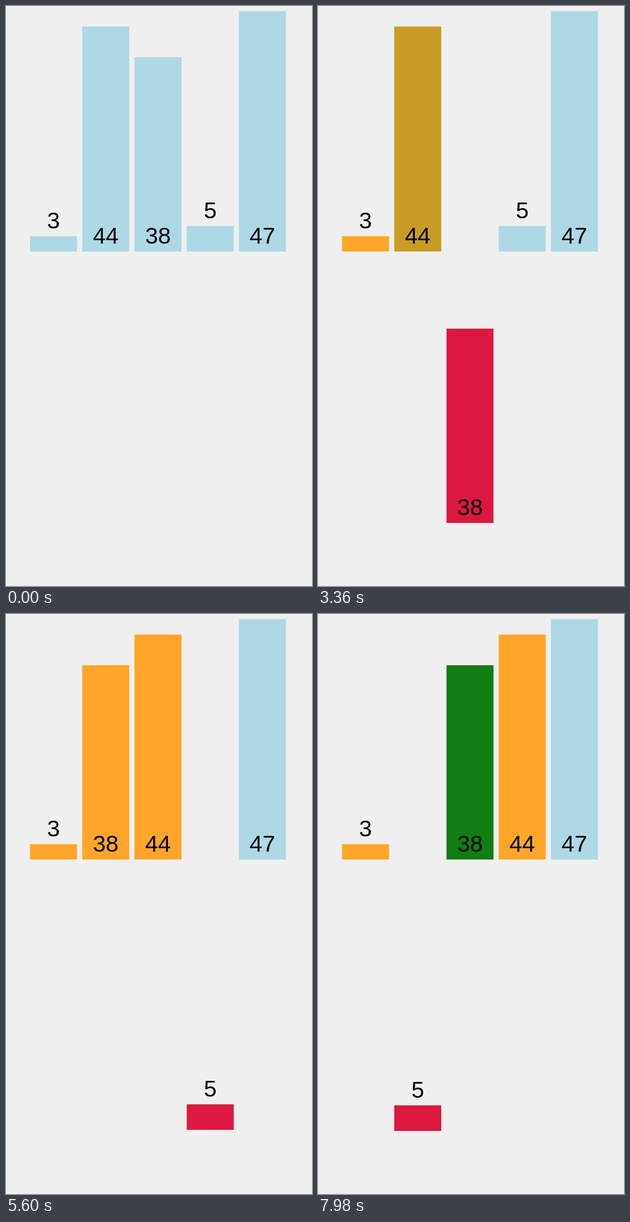
These frames come from a looping animation (544 px wide and 1030 px high, 8 s). An HTML page with a canvas:

```html
<!DOCTYPE html>
<html lang="en">
<head>
<meta charset="utf-8">
<title>Insertion sort</title>
<style>
  html, body { margin: 0; width: 100%; height: 100%; overflow: hidden; background: #efefef; }
  canvas { display: block; }
</style>
</head>
<body>
<canvas id="stage" width="544" height="1030"></canvas>
<script>
const ctx = document.getElementById('stage').getContext('2d');

const LOOP = 8000, TICK = 70, DURATION = 300;
const LEFT = 42.7, PITCH = 92.86, WIDTH = 83.57;
const BASE = 436, DROP = 482, UNIT = 9.08;

const BLUE = [174, 216, 229];
const ORANGE = [255, 165, 41];
const GREEN = [16, 126, 18];
const RED = [221, 24, 64];

const values = [3, 44, 38, 5, 47];

// Each step: start time, then the new properties per bar value.
const steps = [
  [700, { 3: { color: ORANGE } }],
  [1139, { 44: { color: RED, low: 1 } }],
  [1663, { 3: { color: GREEN } }],
  [2187, { 3: { color: ORANGE }, 44: { color: ORANGE, low: 0 } }],
  [2715, { 38: { color: RED, low: 1 } }],
  [3244, { 44: { color: GREEN } }],
  [3768, { 38: { slot: 1 }, 44: { slot: 2 } }],
  [4283, { 3: { color: GREEN }, 44: { color: ORANGE } }],
  [4806, { 3: { color: ORANGE }, 38: { color: ORANGE, low: 0 } }],
  [5330, { 5: { color: RED, low: 1 } }],
  [5863, { 44: { color: GREEN } }],
  [6396, { 5: { slot: 2 }, 44: { slot: 3 } }],
  [6930, { 38: { color: GREEN }, 44: { color: ORANGE } }],
  [7453, { 5: { slot: 1 }, 38: { slot: 2 } }]
];

const mix = (a, b, p) => Array.isArray(a) ? a.map((v, i) => mix(v, b[i], p)) : a + (b - a) * p;
const ease = x => x < 0.5 ? 4 * x ** 3 : 1 - 4 * (1 - x) ** 3;

function barsAt(time) {
  const bars = values.map((value, slot) => ({ value, slot, low: 0, color: BLUE }));
  for (const [start, changes] of steps) {
    if (time <= start) break;
    const p = ease(Math.min(1, (time - start) / DURATION));
    for (const bar of bars) {
      const change = changes[bar.value] || {};
      for (const key in change) bar[key] = mix(bar[key], change[key], p);
    }
  }
  return bars;
}

function drawBar({ value, slot, low, color }) {
  const x = LEFT + slot * PITCH;
  const bottom = BASE + low * DROP;
  const height = value * UNIT;
  ctx.fillStyle = `rgb(${color.map(Math.round).join(',')})`;
  ctx.fillRect(x, bottom - height, WIDTH, height);
  ctx.fillStyle = '#000';
  const labelBase = value < 10 ? bottom - height : bottom;
  ctx.fillText(value, x + WIDTH / 2, labelBase - 14);
}

function draw(time) {
  ctx.fillStyle = '#efefef';
  ctx.fillRect(0, 0, 544, 1030);
  ctx.font = '41px "Liberation Sans", Arial, sans-serif';
  ctx.textAlign = 'center';
  barsAt(time).forEach(drawBar);
}

const origin = performance.now();

function frame() {
  const time = (performance.now() - origin) % LOOP;
  draw(Math.floor((time + 1) / TICK) * TICK);
  requestAnimationFrame(frame);
}

draw(0);
requestAnimationFrame(frame);
</script>
</body>
</html>
```
